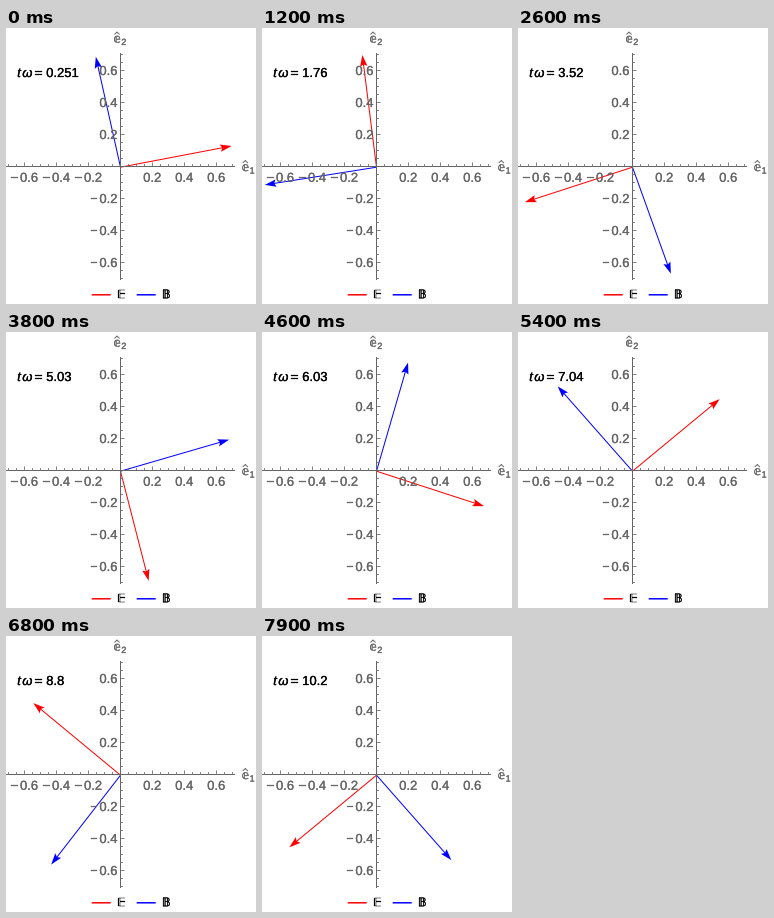
These frames come from a looping animation (250x276 px, 8 s). A matplotlib script:

```python
import numpy as np
import matplotlib.pyplot as plt
from matplotlib.animation import FuncAnimation
from matplotlib.patheffects import withStroke

W, H, DPI = 250, 276, 64
PT = 72 / DPI                      # points per pixel
CX, CY, UNIT = 114.5, 138.5, 160   # axes crossing and pixels per axis unit
ORIGIN = np.array([114.5, 139.2])  # foot of the arrows
LENGTH = UNIT / np.sqrt(2)
FRAMES, STEP = 80, np.pi / 25
GRAY = "0.4"
RED, BLUE = "#ff0000", "#0000ff"
SANS, STRUCK = "Liberation Sans", "DejaVu Sans"

fig = plt.figure(figsize=(W / DPI, H / DPI), dpi=DPI, facecolor="white")
ax = fig.add_axes([0, 0, 1, 1])
ax.set(xlim=(0, W), ylim=(H, 0))
ax.axis("off")


def line(xs, ys, color=GRAY, width=1.0, z=4):
    return ax.plot(xs, ys, color=color, lw=width * PT, zorder=z, snap=False,
                   solid_capstyle="butt")[0]


def text(x, y, s, size=13, color=GRAY, ha="center", family=SANS, bold=0.25,
         **kw):
    stroke = withStroke(linewidth=bold * PT, foreground=color)
    return ax.text(x, y, s, fontsize=size * PT, color=color, ha=ha,
                   va="baseline", family=family, zorder=5,
                   path_effects=[stroke], **kw)


def number(x, y, value):
    text(x, y, f"{abs(value):.1f}")
    if value < 0:
        text(x - 14.5, y, "\u2212")


def draw_axes():
    line([0, 229], [CY, CY])
    line([CX, CX], [25, 252])
    for k in range(-14, 15):
        if k == 0:
            continue
        d = k * UNIT / 20
        major = k % 4 == 0
        size = 4 if major else 2.5
        line([CX + d] * 2, [CY, CY - size], width=0.8)
        line([CX, CX + size], [CY - d] * 2, width=0.8)
        if major:
            number(CX + d + (4.5 if k < 0 else -0.3), 153.8, k / 20)
            number(102.4, CY - d + 4.5, k / 20)


def unit_vector(x, y, index):
    text(x, y, "\U0001D556", 12, family=STRUCK)
    line([x - 2.5, x, x + 2.5], [y - 8, y - 10.5, y - 8])
    text(x + 6.8, y + 2.5, index, 9)


def legend(x, color, letter):
    line([x, x + 19], [266.8, 266.8], color, 1.5)
    text(x + 29.5, 270.3, letter, 12, "black", family=STRUCK)


class Arrow:
    HEAD = np.array([[0, 0], [-11.5, 3.7], [-9.5, 0], [-11.5, -3.7]])

    def __init__(self, color, phase):
        self.phase = phase
        self.shaft = line([], [], color, z=2)
        self.head = ax.fill([0, 0, 0, 0], [0, 0, 0, 0], color=color, lw=0,
                            zorder=3)[0]

    def point(self, t):
        c, s = np.cos(t + self.phase), np.sin(t + self.phase)
        along, side = np.array([c, -s]), np.array([s, c])
        neck = ORIGIN + (LENGTH - 9) * along
        self.shaft.set_data(*zip(ORIGIN, neck))
        self.head.set_xy(ORIGIN + (LENGTH + self.HEAD[:, :1]) * along
                         + self.HEAD[:, 1:] * side)


draw_axes()
unit_vector(239.3, 143, "1")
unit_vector(111, 14.5, "2")
legend(85.7, RED, "\U0001D53C")
legend(130.7, BLUE, "\U0001D539")

text(11.2, 49, "t", color="black", ha="left", style="italic")
text(16.3, 49, "\u03c9", color="black", ha="left", style="italic")
text(28.8, 49, "=", color="black", ha="left")
readout = text(40.2, 49, "", color="black", ha="left")
arrows = [Arrow(RED, -np.pi / 50), Arrow(BLUE, np.pi / 2 - np.pi / 100)]


def update(i):
    t = (i + 2) * STEP
    readout.set_text(f"{t:.3g}")
    for arrow in arrows:
        arrow.point(t)
    return []


anim = FuncAnimation(fig, update, frames=FRAMES, interval=100, repeat=True,
                     repeat_delay=0, init_func=lambda: update(0))
plt.show()
```
